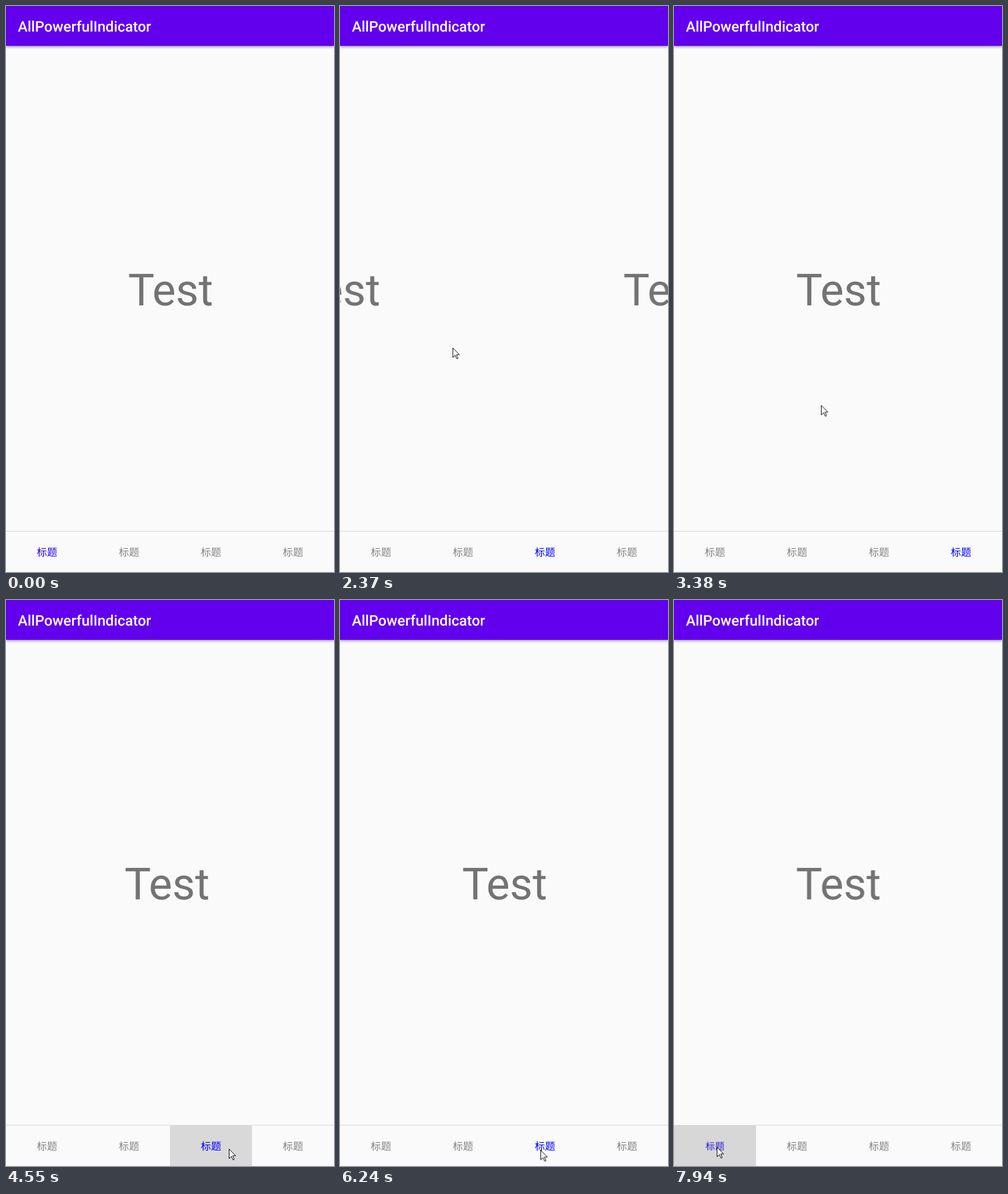
An HTML page for the animation above (8000 ms loop, 552 px wide and 951 px high).

```html
<!DOCTYPE html>
<html lang="zh">
<head>
<meta charset="utf-8">
<title>AllPowerfulIndicator</title>
<style>
  html, body { margin: 0; width: 100%; height: 100%; overflow: hidden; }
  body { background: #fafafa; text-rendering: geometricPrecision; }
  .stage { position: relative; width: 552px; height: 951px; overflow: hidden; background: #fafafa; }

  .bar {
    position: absolute; inset: 0 0 auto; height: 67px; box-sizing: border-box; padding-left: 20px;
    background: #6200ee; color: #fff; box-shadow: 0 2px 4px rgba(0, 0, 0, .36);
    font: 500 24.5px/69px Roboto, sans-serif;
  }

  .pages {
    position: absolute; left: 1px; top: 437px; width: 2208px; display: flex;
    color: #737373; font: 74.4px/84px Roboto, sans-serif; text-align: center;
    animation: swipe 8s linear infinite;
  }
  .pages span { width: 552px; }

  .tabs {
    position: absolute; left: 0; top: 882px; width: 552px; height: 69px; display: flex;
    box-sizing: border-box; border-top: 1px solid #dadada;
    font: 17.2px/68px "Noto Sans CJK SC", "Noto Sans CJK", sans-serif; text-align: center;
  }
  .tab { position: relative; width: 138px; color: #858585; }
  .tab b { position: relative; display: block; font-weight: 400; animation: 8s step-end infinite; }
  .tab:nth-child(1) b { animation-name: pick1; }
  .tab:nth-child(2) b { animation-name: pick2; }
  .tab:nth-child(3) b { animation-name: pick3; }
  .tab:nth-child(4) b { animation-name: pick4; }
  .tab b span { display: block; animation: shrink 8s linear infinite; }

  /* --at: moment of the tap in ms, --x: where it lands in the tab */
  .tab i {
    position: absolute; inset: 0; background: #d7d7d7; opacity: 0;
    animation: ripple 8s linear infinite;
    animation-delay: calc(var(--at) * 1ms - 8000ms);
  }
  .tab i.held { animation-name: held; }

  .cursor { position: absolute; left: 0; top: 0; animation: point 8s linear infinite; }

  @keyframes swipe {
    0%, 16.8% { transform: translateX(0); }
    18.125% { transform: translateX(-131px); }
    18.75% { transform: translateX(-200px); animation-timing-function: cubic-bezier(.23, 1, .32, 1); }
    23.75%, 27.75% { transform: translateX(-552px); }
    29.15% { transform: translateX(-660px); animation-timing-function: cubic-bezier(.23, 1, .32, 1); }
    34.15%, 36.3% { transform: translateX(-1104px); }
    37.625% { transform: translateX(-1224px); animation-timing-function: cubic-bezier(.23, 1, .32, 1); }
    42%, 53.75% { transform: translateX(-1656px); animation-timing-function: cubic-bezier(.23, 1, .32, 1); }
    58.75%, 64.19% { transform: translateX(-1104px); animation-timing-function: cubic-bezier(.23, 1, .32, 1); }
    69.19%, 71.25% { transform: translateX(-1656px); animation-timing-function: cubic-bezier(.23, 1, .32, 1); }
    76.25%, 83.625% { transform: translateX(-1104px); animation-timing-function: cubic-bezier(.23, 1, .32, 1); }
    88.625%, 95.31% { transform: translateX(-552px); animation-timing-function: cubic-bezier(.23, 1, .32, 1); }
    100% { transform: translateX(0); }
  }

  @keyframes pick1 { 0% { color: #2a00f0; } 18.75% { color: #858585; } 95.31%, 100% { color: #2a22d8; } }
  @keyframes pick2 { 0% { color: #858585; } 18.75% { color: #00f; } 29.15% { color: #858585; } 83.625% { color: #00f; } 95.31%, 100% { color: #858585; } }
  @keyframes pick3 {
    0% { color: #858585; } 29.15% { color: #00f; } 37.625% { color: #858585; } 53.75% { color: #00f; }
    64.19% { color: #858585; } 71.25% { color: #00f; } 83.625%, 100% { color: #858585; }
  }
  @keyframes pick4 {
    0% { color: #858585; } 37.625% { color: #00f; } 53.75% { color: #858585; }
    64.19% { color: #00f; } 71.25%, 100% { color: #858585; }
  }
  @keyframes shrink { 0%, 97.5% { transform: none; } 99%, 99.9% { transform: scale(.93); } 100% { transform: none; } }

  @keyframes ripple {
    0% { opacity: 0; clip-path: circle(20px at var(--x) 42px); }
    .9% { opacity: 1; }
    2.8% { clip-path: circle(150px at var(--x) 42px); }
    2.99% { opacity: 1; }
    5.96%, 100% { opacity: 0; clip-path: circle(150px at var(--x) 42px); }
  }
  @keyframes held {
    0% { opacity: 0; clip-path: circle(20px at var(--x) 42px); }
    .9% { opacity: 1; }
    2.8% { clip-path: circle(150px at var(--x) 42px); }
    4.68% { opacity: 1; }
    4.687%, 100% { opacity: 0; clip-path: circle(150px at var(--x) 42px); }
  }

  @keyframes point {
    0%, 3.37% { opacity: 0; transform: translate(437px, 869px); }
    3.375% { opacity: 1; transform: translate(437px, 869px); }
    11.25% { transform: translate(308px, 523px); }
    13% { transform: translate(324px, 534px); }
    14.875%, 16.75% { transform: translate(341px, 548px); }
    18.125% { transform: translate(127px, 552px); }
    19%, 20.5% { transform: translate(90px, 556px); }
    26.75%, 27.75% { transform: translate(350px, 566px); }
    29.625% { transform: translate(190px, 574px); }
    30.5%, 31.25% { transform: translate(150px, 578px); }
    33.5%, 36.25% { transform: translate(340px, 590px); }
    37.75%, 38.5% { transform: translate(150px, 600px); }
    42.25% { transform: translate(247px, 670px); }
    44.125%, 46.125% { transform: translate(314px, 750px); }
    52%, 58.75% { transform: translate(375px, 922px); }
    63.625%, 66.875% { transform: translate(446px, 928px); }
    69.375% { transform: translate(416px, 923px); }
    71.125%, 77.5% { transform: translate(350px, 924px); }
    83%, 85% { transform: translate(214px, 926px); }
    87.625% { transform: translate(108px, 921px); }
    89.625%, 92.375% { transform: translate(84px, 919px); }
    93.375%, 100% { opacity: 1; transform: translate(72px, 919px); }
  }
</style>
</head>
<body>
<div class="stage">
  <div class="pages"><span>Test</span><span>Test</span><span>Test</span><span>Test</span></div>
  <div class="bar">AllPowerfulIndicator</div>
  <div class="tabs">
    <div class="tab"><i class="held" style="--at: 7625; --x: 72px"></i><b><span>标题</span></b></div>
    <div class="tab"><i style="--at: 6690; --x: 76px"></i><b>标题</b></div>
    <div class="tab"><i style="--at: 4300; --x: 99px"></i><i style="--at: 5700; --x: 74px"></i><b>标题</b></div>
    <div class="tab"><i style="--at: 5135; --x: 32px"></i><b>标题</b></div>
  </div>
  <svg class="cursor" width="14" height="21">
    <path d="M.5 .5V16.5L4.4 12.8L6.8 18.4H8.9V17.2L6.7 11.8H11.5Z" fill="#fff" stroke="#000"/>
  </svg>
</div>
</body>
</html>
```
